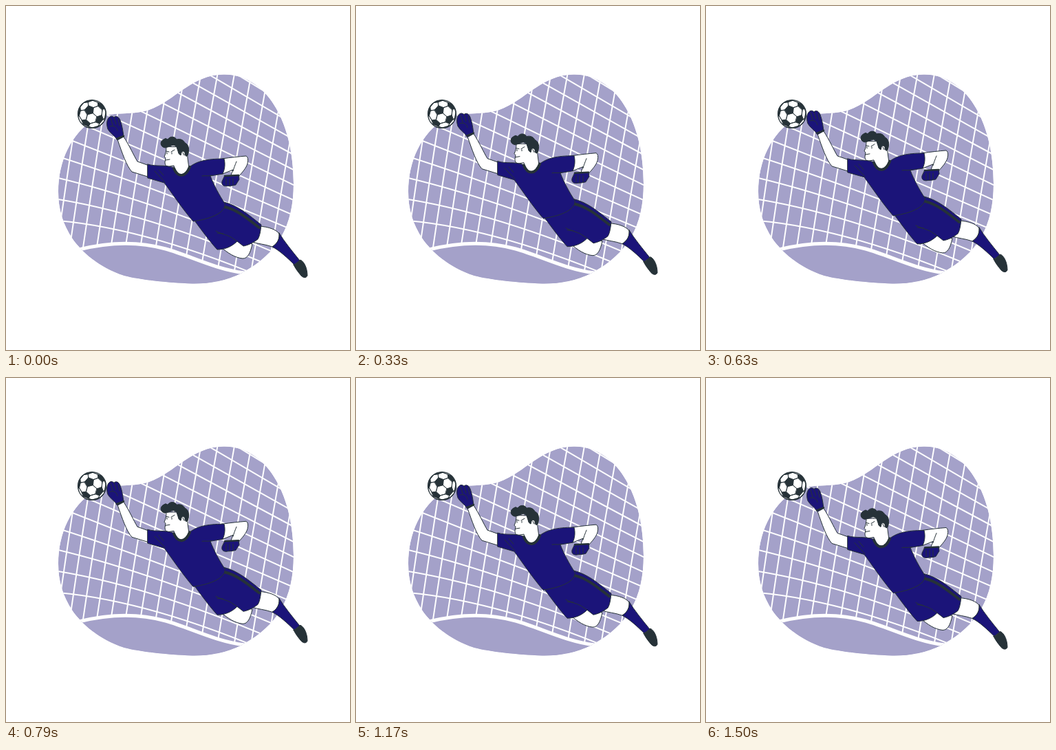
Write an HTML page with a canvas that moves like this. It is 500 px wide and 500 px high and loops after 1.54 s.

```html
<!DOCTYPE html>
<html lang="en">
<head>
<meta charset="utf-8">
<title>Goalkeeper save</title>
<style>
  html, body { margin: 0; width: 100%; height: 100%; overflow: hidden; background: #fff; }
  canvas { display: block; width: 100%; height: 100%; }
</style>
</head>
<body>
<canvas id="stage" width="500" height="500"></canvas>
<script>
const ctx = document.getElementById('stage').getContext('2d');
const NAVY = '#1b1479', LILAC = '#a4a1c9', INK = '#263238', WHITE = '#fff';
const LOOP = 1540, STEPS = 37, LIFT = 10;

ctx.lineJoin = ctx.lineCap = 'round';

function shape(d, fill, stroke = INK, width = 1) {
  const path = new Path2D(d);
  if (fill) {
    ctx.fillStyle = fill;
    ctx.fill(path);
  }
  if (stroke) {
    ctx.strokeStyle = stroke;
    ctx.lineWidth = width;
    ctx.stroke(path);
  }
}
const line = (d, color = INK, width = 1) => shape(d, null, color, width);

const BLOB = 'M316 99.5C374 98 418 162 418 258C418 320 395 360 343 388C318 400 295 404 270 403.5' +
  'C235 402 195 398 172 392C135 380 110 357 97 339C82 316 76 295 76 270' +
  'C76 225 95 185 128 165C150 152 180 160 208 151C245 138 270 100 316 99.5Z';
const GROUND = 'M106 354C150 343 193 342 232 353C268 363 302 382 347 388';

function drawNet() {
  for (let i = -12; i <= 6; i++) {
    const x = 308 + 24.5 * i + 0.3 * Math.min(i, 0) ** 2;
    const lean = 52 + 0.8 * Math.min(i, 0);
    line(`M${x + 2} 85Q${x - lean * 0.45} 225 ${x - lean} 400`, WHITE, 2);
  }
  for (let j = 0; j <= 14; j++) {
    const left = 312 - 31 * j, right = 414 - 22 * j;
    const bend = Math.max(0, 30 - 7 * j);
    line(`M76 ${left}Q220 ${left + (right - left) * 0.42 - bend} 418 ${right}`, WHITE, 2);
  }
}

function drawScene() {
  ctx.save();
  ctx.clip(new Path2D(BLOB));
  shape(BLOB, LILAC, null);
  drawNet();
  shape(GROUND + 'L370 392V420H90Z', LILAC, null);
  line(GROUND, WHITE, 5);
  ctx.restore();
}

// Ball: a truncated icosahedron seen from the front.
const BALL = { x: 125, y: 157, r: 20.5, spin: -0.52, tiltX: -0.2, tiltY: -0.3 };

function polar(angle, turn) {
  const x = Math.sin(angle) * Math.cos(turn), y = Math.sin(angle) * Math.sin(turn);
  const z = Math.cos(angle);
  const x1 = x * Math.cos(BALL.tiltX) + z * Math.sin(BALL.tiltX);
  const z1 = z * Math.cos(BALL.tiltX) - x * Math.sin(BALL.tiltX);
  return [x1, y * Math.cos(BALL.tiltY) + z1 * Math.sin(BALL.tiltY),
    z1 * Math.cos(BALL.tiltY) - y * Math.sin(BALL.tiltY)];
}

function between(a, b, t) {
  const p = a.map((v, i) => v + (b[i] - v) * t);
  const size = p[2] < 0 ? Math.hypot(p[0], p[1]) : Math.hypot(...p);
  return [BALL.x + BALL.r * p[0] / size, BALL.y + BALL.r * p[1] / size];
}

const hubs = [polar(0, 0)];
for (let i = 0; i < 5; i++) {
  const turn = BALL.spin + i * Math.PI * 0.4;
  hubs.push(polar(1.107, turn), polar(Math.PI - 1.107, turn + Math.PI / 5));
}
const dot = (a, b) => a[0] * b[0] + a[1] * b[1] + a[2] * b[2];

function drawBall() {
  const circle = new Path2D();
  circle.arc(BALL.x, BALL.y, BALL.r, 0, 7);
  ctx.save();
  ctx.fillStyle = WHITE;
  ctx.fill(circle);
  ctx.clip(circle);
  for (const hub of hubs.filter(h => h[2] > -0.25)) {
    const near = hubs.filter(h => h !== hub && dot(h, hub) > 0.4);
    const corners = near.map(h => between(hub, h, 0.34));
    const cx = corners.reduce((s, p) => s + p[0], 0) / corners.length;
    const cy = corners.reduce((s, p) => s + p[1], 0) / corners.length;
    corners.sort((a, b) => Math.atan2(a[1] - cy, a[0] - cx) - Math.atan2(b[1] - cy, b[0] - cx));
    shape('M' + corners.join('L') + 'Z', INK);
    for (const h of near) line(`M${between(hub, h, 0.34)}L${between(hub, h, 0.66)}`);
  }
  ctx.restore();
  ctx.lineWidth = 1.2;
  ctx.strokeStyle = INK;
  ctx.stroke(circle);
}

function drawLegs() {
  shape('M312 350C322 359 333 366 344 367C351 367 355 360 358 346L336 340Z', WHITE);
  shape('M368 320C382 321 393 325 397 331C398 340 393 346 387 350C376 346 367 346 358 343Z', WHITE);
  shape('M397 330C405 343 415 355 427 370L419 376C409 366 397 355 387 350C395 345 398 338 397 330Z', NAVY);
  shape('M418 376C423 375 425 370 428 369C434 372 438 382 438 392C436 396 432 395 429 392C424 386 421 382 418 376Z', INK);
}

function drawShorts() {
  shape('M317 285C337 290 352 303 371 318C370 327 369 334 366 339C358 345 351 348 345 349' +
    'L336 342C328 350 318 354 307 354C296 342 286 328 274 312Z', NAVY);
  line('M318 292C336 296 351 309 368 322', INK, 4);
  line('M305 327C314 332 324 333 330 338L336 342M307 330L316 331');
}

function drawRaisedArm() {
  shape('M162 194C169 214 175 232 183 241L209 249L208 232L191 226C185 216 180 204 171 190Z', WHITE);
  shape('M149 163C151 159 155 160 157 162C160 159 164 161 166 166C169 174 170 182 171 190' +
    'L162 195C158 188 151 185 148 179C146 173 146 166 149 163Z', NAVY);
  line('M161 193L171 189', INK, 2.5);
  line('M152 163L155 173M157 162L160 172M163 164L165 174M151 175C157 173 161 176 162 181');
}

function drawBentArm() {
  shape('M314 222C327 220 338 219 349 218Q353 220 351 229C349 236 343 242 338 248L327 246L330 238L315 244Z', WHITE);
  line('M335 226C333 231 331 236 330 240');
  shape('M318 247L338 246L339 252L334 260C328 262 324 261 320 262C315 262 313 259 314 255Z', NAVY);
  line('M318 247L338 246', INK, 2.5);
  line('M320 251V260M325 251V261M330 251V260');
}

function drawHead() {
  shape('M233 205C233 211 232 215 230 219L232 221L231 227C231 232 234 234 238 233L244 232' +
    'L247 244Q256 250 266 236L264 221L263 205Z', WHITE);
  shape('M231 206C224 205 223 197 229 194Q232 191 235 194C239 188 246 190 248 194' +
    'C254 192 259 196 260 199C266 201 267 210 264 217Q262 220 260 216C261 211 256 210 255 213' +
    'L254 217Q250 215 250 211L248 205Q244 200 238 204Z', INK);
  line('M233 211L237 212M240 212L245 209M234 213V215M241 213V215M232 224L238 223M257 213L259 217');
}

function drawJersey() {
  shape('M206 230C219 234 231 230 243 235C250 249 260 248 268 233C278 226 290 222 317 222' +
    'C319 230 318 237 315 244L297 247C302 260 310 275 318 287C320 299 301 309 272 313' +
    'C255 293 242 273 230 257L206 250Z', NAVY);
  line('M244 236C250 250 261 249 267 234', INK, 4);
  line('M285 247C290 246 294 248 299 246M216 240L231 256M222 238L229 246');
}

function drawKeeper() {
  drawLegs();
  drawShorts();
  drawRaisedArm();
  drawBentArm();
  drawHead();
  drawJersey();
}

function draw(time) {
  const step = Math.floor((time % LOOP) * STEPS / LOOP + 0.1) % STEPS;
  const lift = LIFT * (1 - Math.abs(1 - 2 * step / STEPS));
  ctx.fillStyle = WHITE;
  ctx.fillRect(0, 0, 500, 500);
  drawScene();
  drawBall();
  ctx.save();
  ctx.translate(0, -lift);
  drawKeeper();
  ctx.restore();
}

const start = performance.now();
function tick() {
  draw(performance.now() - start);
  requestAnimationFrame(tick);
}
tick();
</script>
</body>
</html>
```
